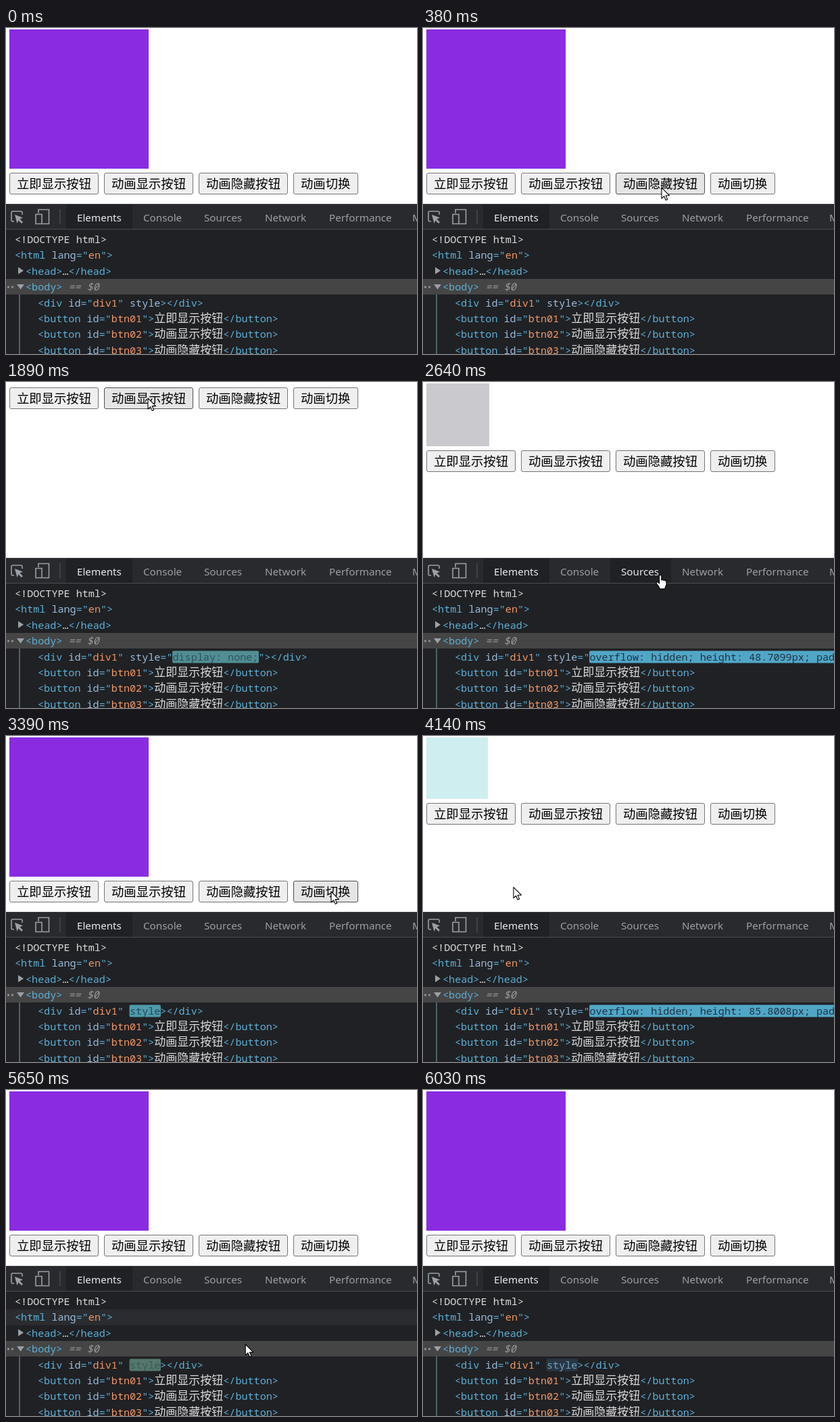
Write an HTML page that moves like this. It is 608 px wide and 482 px high and loops after 6160 ms.

```html
<!DOCTYPE html>
<html lang="en">
<head>
<meta charset="utf-8">
<title>Show and hide</title>
<style>
  html, body { margin: 0; width: 100%; height: 100%; overflow: hidden; background: #fff; }
  svg { display: block; width: 608px; height: 482px; }
  text { white-space: pre; }
  .label { font: 18.35px "Noto Sans CJK SC", "Noto Sans CJK", sans-serif; fill: #000; }
  .tab { font: 15.2px "Noto Sans", "Open Sans", sans-serif; fill: #9aa0a6; }
  .code { font: 15.12px "Noto Sans Mono", "DejaVu Sans Mono", monospace; fill: #5db0d7; }
  .han { font: 300 17px "Noto Sans CJK SC", "Noto Sans CJK", sans-serif; fill: #dcdcdc; }
  .plain { fill: #dcdcdc; }
  .name { fill: #9bbbdc; }
  .value { fill: #f29766; }
  .dim { fill: #9a9a9a; font-style: italic; }
</style>
</head>
<body>
<svg id="stage" viewBox="0 0 608 482"></svg>
<script>
const LOOP = 6160, STEP = 125.6, CHAR = 9.07, FULL = 206;
const stage = document.getElementById('stage');

function add(tag, attrs, parent = stage, text = '') {
  const node = document.createElementNS('http://www.w3.org/2000/svg', tag);
  set(node, attrs);
  node.textContent = text;
  parent.appendChild(node);
  return node;
}
function set(node, attrs) {
  for (const key in attrs) node.setAttribute(key, attrs[key]);
}
const rect = (x, y, width, height, fill, parent) => add('rect', { x, y, width, height, fill }, parent);
const path = (d, attrs, parent) => add('path', { d, ...attrs }, parent);

// Interpolates a list of [position, ...values] stops.
function ramp(stops, at) {
  if (at <= stops[0][0]) return stops[0].slice(1);
  for (let i = 1; i < stops.length; i++) {
    const [a, ...from] = stops[i - 1], [b, ...to] = stops[i];
    if (at <= b) return from.map((v, k) => v + (to[k] - v) * (at - a) / (b - a));
  }
  return stops[stops.length - 1].slice(1);
}
const rgb = values => `rgb(${values.map(Math.round)})`;

// Page: square and buttons
const square = rect(5, 2, FULL, FULL, '#8a2be2');
const buttonRow = add('g', {});
const captions = ['立即显示按钮', '动画显示按钮', '动画隐藏按钮', '动画切换'];
const buttons = captions.map((caption, i) => {
  const x = 5 + i * 140, width = i < 3 ? 132 : 96;
  const face = add('rect', { x: x + .5, y: .5, width: width - 1, height: 31, rx: 2.5 }, buttonRow);
  add('text', { x: x + 11, y: 23, class: 'label' }, buttonRow, caption);
  return { x, width, face };
});

// Inspector: toolbar
rect(0, 260, 608, 222, '#202124');
rect(0, 260, 608, 37, '#292a2d');
rect(0, 260, 608, 1, '#3c3f43');
rect(0, 297, 608, 1, '#494c50');
const stroke = { fill: 'none', stroke: '#9aa0a6', 'stroke-width': 1.6 };
path('M12 286H10Q8 286 8 284V273Q8 271 10 271H22Q24 271 24 273V276', stroke);
path('M13 276L25 280.5L20.5 282.5L25 287L23 289L18.5 284.5L16.5 289Z', { fill: '#9aa0a6' });
path('M48 274V268.5H63.5V289.5H54M44 275.5H53V289.5H44Z', stroke);
rect(79.5, 268, 1, 22, '#55585c');

const tabs = [['Elements', 105, 66], ['Console', 203, 58], ['Sources', 293, 58],
  ['Network', 383, 62], ['Performance', 478, 91], ['Memory', 601, 60]].map(([name, x, width], i) => {
  const back = rect(x - 16, 261, width + 32, 36, '#202124');
  const label = add('text', { x, y: 286, class: 'tab' }, stage, name);
  return { x: x - 16, width: width + 32, back, label, active: i === 0 };
});

// Inspector: element tree
const rowTop = i => 301 + i * 23.4;
const hoverRow = rect(0, 0, 608, 23.4, '#2b2c2f');
rect(0, 371, 608, 23, '#454545');
rect(19.5, 394, 1, 88, '#7ea3b3');
rect(2, 381.5, 3, 3, '#8d8d8d');
rect(8, 381.5, 3, 3, '#8d8d8d');
path('M18 353.5L26 358.8L18 364Z', { fill: '#9aa0a6' });
path('M16 379H27L21.5 386.5Z', { fill: '#9aa0a6' });
const flash = add('rect', { y: 397.5, height: 18, rx: 2 });

// Each part is [text, class]; Han text follows its own advance.
function codeLine(row, x, parts) {
  const line = add('text', { x, y: 318 + row * 23.4, class: 'code' });
  return parts.map(([text, cls]) => add('tspan', { class: cls || '' }, line, text));
}
codeLine(0, 13, [['<!DOCTYPE html>', 'plain']]);
codeLine(1, 13, [['<html '], ['lang', 'name'], ['="'], ['en', 'value'], ['">']]);
codeLine(2, 29, [['<head>'], ['…', 'plain'], ['</head>']]);
codeLine(3, 29, [['<body>'], [' == $0', 'dim']]);
const divParts = codeLine(4, 47, [['<div '], ['id', 'name'], ['="'], ['div1', 'value'], ['" '],
  ['style', ''], [''], [''], ['></div>']]);
const [styleName, styleOpen, styleValue, styleEnd] = divParts.slice(5);
captions.slice(0, 3).forEach((caption, i) => codeLine(5 + i, 47, [['<button '], ['id', 'name'], ['="'],
  ['btn0' + (i + 1), 'value'], ['">'], [caption, 'han'], ['</button>']]));

// Pointers
const ink = { fill: '#fff', stroke: '#000', 'stroke-width': 1.1, 'stroke-linejoin': 'round' };
const arrow = path('M0 0V16L3.7 12.6L6.2 18.4L8.7 17.3L6.2 11.6H11.5Z', ink);
const hand = path('M-1.6 1.5Q0 -1 1.6 1.5V8Q3 6.6 4.2 8.4Q5.8 7.2 6.8 9Q8.6 8.2 8.8 10.5V15' +
  'L7 18.5V21H-1.5V19L-5.8 12.8Q-6 10 -3.5 11L-1.6 13Z', ink);

// Timeline
const phases = [
  { start: 747.4, hide: true, lead: .0671915, pale: [203, 204, 206] },
  { start: 2168.6, hide: false, lead: -.1404292, pale: [203, 204, 206] },
  { start: 3607.6, hide: true, lead: .0081507, pale: [205, 238, 240] }
];
const INSTANT_SHOW = 5200;
const route = [[0, 340, 368], [126, 345, 356], [251, 352, 305], [377, 353, 236], [880, 353, 236],
  [1130, 273, 219], [1400, 215, 60], [1760, 210, 24], [2390, 210, 24], [2637, 351, 285],
  [2900, 440, 250], [3150, 481, 230], [3790, 481, 230], [4144, 134, 224], [4500, 90, 60],
  [4900, 72, 24], [5290, 72, 24], [5450, 230, 180], [5655, 356, 379], [5778, 400, 490]];

const swing = p => .5 - Math.cos(Math.PI * Math.min(1, Math.max(0, p))) / 2;
const visible = (phase, p) => phase.hide ? 1 - swing(p) : swing(p);
const lastPhase = test => phases.filter(test).pop();

function drawSquare(t) {
  const phase = lastPhase(p => t >= p.start);
  let amount = 1, pale = phases[0].pale;
  if (phase && t < INSTANT_SHOW) {
    amount = visible(phase, (t - phase.start) / 1000);
    pale = phase.pale;
  }
  const size = Math.round(FULL * amount);
  const fill = rgb(ramp([[0, 255, 255, 255], [.12, 252, 252, 253], [.447, ...pale],
    [.68, 139, 80, 192], [1, 138, 43, 226]], amount));
  set(square, { width: size, height: size, fill });
  set(buttonRow, { transform: `translate(0 ${size + 8})` });
  return size + 8;
}

function drawStyle(t) {
  const progress = p => (t - p.start) / 1000 + p.lead;
  const phase = lastPhase(p => progress(p) >= 0);
  let value = '', age = 9;
  if (t >= INSTANT_SHOW) {
    age = (t - INSTANT_SHOW) / 1000;
  } else if (phase) {
    const p = progress(phase);
    age = Math.max(0, p - 1);
    if (p < 1) value = `overflow: hidden; height: ${(200 * visible(phase, p)).toPrecision(6)}px; padding: 0px;`;
    else if (phase.hide) value = 'display: none;';
  }
  const lit = rgb(ramp([[0, 28, 51, 71], [.1, 38, 78, 98], [.45, 60, 90, 88],
    [.83, 111, 163, 196], [1, 155, 187, 220]], age));
  const back = rgb(ramp([[0, 81, 166, 198], [.1, 79, 151, 165], [.45, 85, 119, 109],
    [.83, 42, 55, 68], [1, 32, 33, 36]], age));
  styleName.style.fill = value ? '#9bbbdc' : lit;
  styleOpen.textContent = value && '="';
  styleValue.textContent = value;
  styleValue.style.fill = age < 1 ? lit : '#f29766';
  styleEnd.textContent = value ? '"></div>' : '></div>';
  set(flash, {
    x: 46.5 + CHAR * (value ? 22 : 15),
    width: CHAR * (value.length || 5) + 1,
    fill: age < 1 ? back : 'none'
  });
}

function drawPointer(t, buttonTop) {
  const [x, y] = ramp(route, t);
  const shown = t > 120 && t < 5850;
  const inside = (item, top, height) => shown && x >= item.x && x < item.x + item.width && y >= top && y < top + height;
  for (const button of buttons) {
    const over = inside(button, buttonTop, 32);
    set(button.face, { fill: over ? '#e5e5e5' : '#efefef', stroke: over ? '#4f4f4f' : '#767676' });
  }
  let overTab = false;
  for (const tab of tabs) {
    const over = inside(tab, 261, 36);
    const bright = over || tab.active;
    overTab = overTab || over;
    set(tab.back, { opacity: bright ? 1 : 0 });
    tab.label.style.fill = bright ? '#e8eaed' : '#9aa0a6';
  }
  // Row highlighting trails slightly behind the pointer.
  const row = Math.floor((ramp(route, t - 45)[1] - rowTop(0)) / 23.4);
  set(hoverRow, { y: rowTop(row), opacity: shown && row >= 0 && row < 8 ? 1 : 0 });

  const transform = `translate(${x.toFixed(1)} ${y.toFixed(1)})`;
  set(arrow, { transform, opacity: shown && !overTab ? 1 : 0 });
  set(hand, { transform, opacity: shown && overTab ? 1 : 0 });
}

function render(time) {
  const t = Math.min(48, Math.floor((time + 8) / STEP)) * STEP;
  drawPointer(t, drawSquare(t));
  drawStyle(t);
}

const began = performance.now();
function tick() {
  render((performance.now() - began) % LOOP);
  requestAnimationFrame(tick);
}
tick();
</script>
</body>
</html>
```
